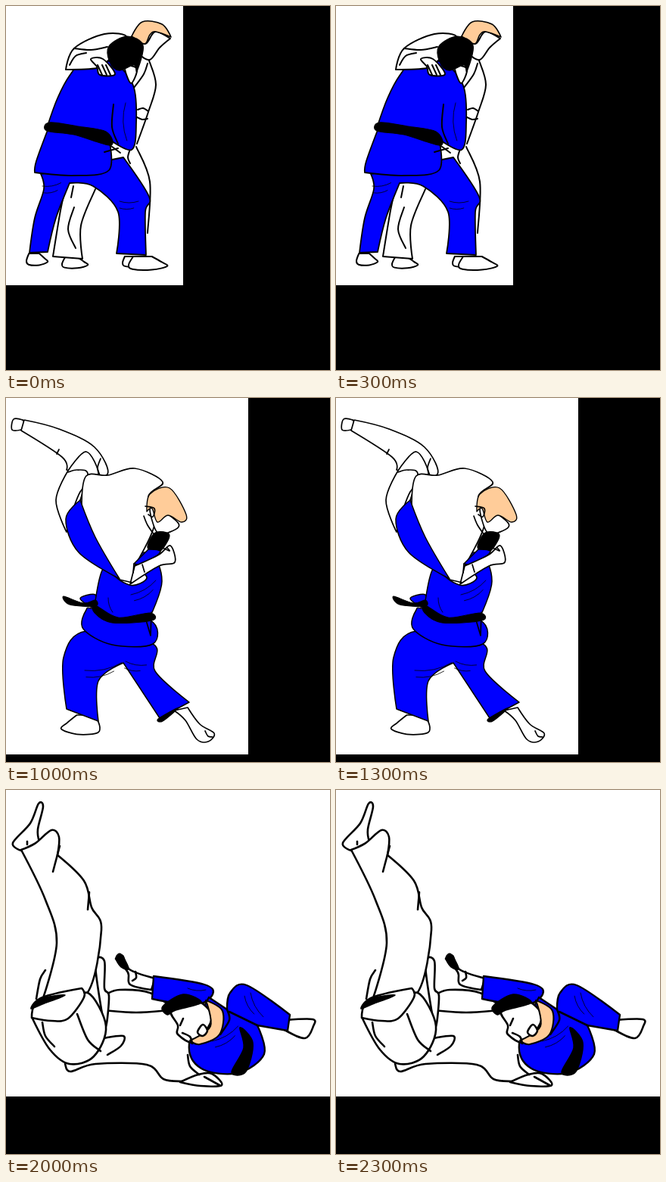
An HTML page that plays this animation: 428 px wide and 481 px high, repeating every 2.5 s.

```html
<!DOCTYPE html>
<html lang="en">
<head>
<meta charset="utf-8">
<title>Judo throw</title>
<style>
html, body { margin: 0; width: 100%; height: 100%; overflow: hidden; background: #000; }
svg { display: block; width: 428px; height: 481px; }
path { stroke: #000; stroke-linejoin: round; stroke-linecap: round; vector-effect: non-scaling-stroke; }
</style>
</head>
<body>
<svg id="stage" viewBox="0 0 428 481"></svg>
<script>
const STEP = 500, LOOP = 2500;
const stage = document.getElementById('stage');
const poses = [];
let layer, weight;

function add(parent, tag, attrs) {
  const el = document.createElementNS('http://www.w3.org/2000/svg', tag);
  for (const k in attrs) el.setAttribute(k, attrs[k]);
  return parent.appendChild(el);
}

// Smooth curve through "x,y" points; a trailing "!" marks a sharp corner.
function curve(text, closed) {
  const pts = text.split(' ').map(s => {
    const [x, y] = s.replace('!', '').split(',').map(Number);
    return { x, y, sharp: s.endsWith('!') };
  });
  const n = pts.length;
  const at = i => closed ? pts[(i + n) % n] : pts[Math.max(0, Math.min(n - 1, i))];
  const handle = (i, dir) => {
    const p = at(i), a = at(i - 1), b = at(i + 1), k = p.sharp ? 0 : dir / 6;
    return `${p.x + (b.x - a.x) * k} ${p.y + (b.y - a.y) * k} `;
  };
  let d = `M${pts[0].x} ${pts[0].y}`;
  for (let i = 0; i < (closed ? n : n - 1); i++) {
    const q = at(i + 1);
    d += `C${handle(i, 1)}${handle(i + 1, -1)}${q.x} ${q.y}`;
  }
  return d;
}

const pen = (fill, scale, closed = true) => (text, transform = '') =>
  add(layer, 'path', { d: curve(text, closed), fill, transform, 'stroke-width': weight * scale });
const white = pen('#fff', 1), blue = pen('#00f', 0.9), skin = pen('#fc9', 0.8);
const black = pen('#000', 0.6), plain = pen('#fff', 0), line = pen('none', 1, false);

// Side view of a foot, heel at x,y; a negative length points it left.
const foot = (x, y, length, height, angle = 0) =>
  white('.12,-1! 0,-.3 .1,.05 .6,.1 1,-.2 .85,-.55 .6,-1!',
    `translate(${x} ${y}) rotate(${angle}) scale(${length} ${height})`);

// Bare shin stepping down to the right.
const shin = (x, y) => {
  white('0,0! 15,13 30,38 45,41 53,30 34,18 18,-4!', `translate(${x} ${y})`);
  line('41,27 45,34 51,35', `translate(${x} ${y})`);
};

// Parallel cloth folds, each shorter than the one before.
function folds(x, y, length, angle, count = 2) {
  for (let i = 0; i < count; i++) {
    const l = length * (1 - i * 0.25);
    add(layer, 'path', {
      d: `M0 ${i * 9}q${l / 2} ${l / 6} ${l} 0`, fill: 'none', 'stroke-width': 0.8,
      transform: `translate(${x} ${y}) rotate(${angle})`
    });
  }
}

function pose(w, h, lineWeight, draw) {
  layer = add(stage, 'g', {});
  weight = lineWeight;
  add(layer, 'rect', { width: w, height: h, fill: '#fff' });
  draw();
  poses.push(layer);
}

// Grip
pose(234, 369, 2, () => {
  line('189,72 198,104 188,140 173,182');
  line('187,76 182,90 169,108');
  line('174,137 181,135 188,139');
  line('173,147 180,150 187,149');
  line('172,186 190,232 187,300');
  line('164,189 161,200 164,208');
  white('166,40 184,50 197,34 217,43! 203,55 190,71 175,62');
  skin('166,40! 180,21 206,24 218,41! 198,34 190,38 183,50');
  // Legs
  foot(74, 345, 34, 13);
  foot(27, 341, 28, 14);
  foot(154, 343, 24, 12);
  foot(162, 347, 51, 16);
  plain('78,244! 62,331! 101,334! 118,242!');
  line('78,244 72,270 62,331! 101,334! 99,290 118,242');
  line('90,266 82,295 92,320');
  line('89,238 86,253');
  blue('46,222! 50,242 38,280 31,326! 55,325! 66,280 84,234! 115,238 148,272 146,327! 185,329! 184,272 189,252 155,200!');
  folds(48, 238, 25, -10);
  folds(150, 258, 25, 0);
  // Jacket
  blue('55,164! 40,205 38,220! 90,224 136,217 136,176!');
  blue('100,77 84,92 68,122 55,158! 136,176! 166,190 172,155 168,105 140,74');
  line('142,130 140,160 148,182');
  folds(158, 128, 50, 88, 1);
  black('57,154 95,159 132,166 138,184 90,170 54,165');
  line('130,193 148,188');
  line('132,180 151,194');
  // Sleeve, head and hand
  white('160,42 130,37 90,56 79,84! 120,82 135,72');
  line('90,56 112,58 134,54');
  line('84,78 92,66 106,62');
  white('157,80 165,102 173,83');
  black('137,74 136,53 160,40 181,52 173,86 169,78 149,85');
  white('112,70 128,70 144,90 124,91 120,80');
  for (const x of [121, 127, 132]) line(`${x},78 ${x + 6},91`);
});

// Turn in
pose(259, 381, 1.8, () => {
  white('30,33! 20,28 15,39 24,51!');
  white('30,33! 82,41! 106,32 84,52 70,62 24,50!');
  line('82,41 76,49');
  foot(109, 365, -38, 23);
  shin(192, 322);
  // Trousers
  blue('72,228 53,265 62,312 88,344! 105,325 103,265 130,254! 142,280 166,332! 212,320! 180,273 172,240');
  black('166,332 195,322 178,333');
  folds(67, 292, 42, -32);
  folds(142, 272, 32, 30);
  // Jacket
  blue('90,202 68,236 130,253 176,236 169,206');
  blue('88,50! 54,75 69,137 90,155 92,198! 168,198! 196,132 201,112 168,96 140,95');
  folds(89, 150, 25, 70, 1);
  folds(192, 122, 60, 120);
  folds(158, 158, 36, 120, 1);
  black('93,191 128,201 169,194 168,206 126,212 93,200');
  // Shoulder, head and arm
  white('85,52 105,32 140,13 165,18 153,78! 139,96 137,110 154,112! 158,123 122,148 97,132 92,105');
  line('128,121 136,128 133,120');
  line('138,110 144,124');
  white('136,52 150,76 158,82 176,66 155,48');
  skin('131,44 135,22 168,21 186,54 172,60 150,49 145,55 139,49 135,60');
  black('154,80 170,76 165,97 148,93');
  white('155,112! 171,97 193,100 190,116 158,124!');
  line('188,106 191,115');
});

// Load
pose(320, 471, 1.7, () => {
  white('22,29! 10,28 8,42 20,42! 25,34');
  white('24,29! 70,41 117,65 133,102 80,95! 74,78 20,43!');
  line('70,68 67,74');
  white('82,96! 66,135 80,177! 98,124 122,103 106,71');
  line('82,98 94,95 108,100 98,135');
  line('125,80 121,92 124,102');
  foot(124, 442, -51, 23);
  shin(222, 413);
  // Trousers
  blue('106,308 76,343 80,411! 122,427! 122,374 155,350! 203,423! 242,402! 197,361 194,325');
  black('201,424 228,409 207,427');
  folds(104, 360, 50, -12);
  folds(158, 348, 28, 10);
  // Jacket
  blue('118,260 98,265 118,278');
  blue('118,279 106,280 102,305 140,326 194,325 191,294');
  blue('128,226 118,268 119,280! 150,294 190,290! 206,242 190,205 150,215');
  folds(165, 260, 38, -30);
  folds(135, 264, 20, 73, 1);
  black('118,274 148,290 190,284 193,294 140,297 117,284');
  black('76,262 102,271 118,267 118,275 84,273');
  line('184,290 191,314! 192,283');
  // Torso and head
  white('106,103 135,102 170,93 207,111 188,130 196,168 170,222! 186,238 163,247 133,222 104,158 100,138');
  blue('98,135! 79,160 96,204 150,239! 118,184');
  white('190,146 200,178 219,176 228,166 202,146');
  skin('186,150! 190,127 216,119 238,154 232,164 214,155 200,164 193,146');
  line('184,143 196,146 194,157 188,154');
  line('182,156 187,168 196,181');
  black('197,178 216,181 203,203 187,198');
  blue('188,200! 204,203 184,219 169,219!');
  white('170,222! 202,207 217,195 223,217 202,222 164,246!');
  line('169,219 168,231');
  line('180,220 183,230');
  line('207,198 216,202 213,198');
  line('150,240 167,244');
});

// Over
pose(364, 481, 2.2, () => {
  white('132,418! 119,414 115,422 118,434 126,434');
  white('302,444! 339,449 343,455 325,470 302,460!');
  // Jacket and trousers
  blue('172,415 129,420 113,452! 157,459 192,464 206,458');
  black('138,461 158,434 173,426 150,460');
  blue('252,410! 306,440! 293,468! 252,448');
  folds(262, 455, 25, -45, 1);
  blue('238,338! 253,374 258,420 236,454 193,452 170,416 164,398! 205,370');
  folds(236, 385, 30, 75);
  folds(180, 428, 25, 45, 1);
  black('206,451 239,448 263,425 242,456 224,462');
  // Far leg and foot
  white('76,94 106,155 102,212');
  line('60,87 55,72 64,54 77,44 70,35 76,22');
  white('28,93! 20,80 42,62 58,29 75,18 70,35 77,44 55,72 50,90!');
  black('60,66! 63,73 79,64! 77,74 52,90!');
  // Torso and near leg
  white('94,268 120,254 137,257! 146,239 161,232 160,205 172,195 188,206 202,246 204,279 207,357! 211,380 178,396 144,369 115,346 62,319!');
  plain('80,285! 100,262! 130,262! 130,310!');
  line('94,268 112,233 104,222');
  white('28,93! 52,92 75,78! 83,140 104,190 92,278 66,323! 25,288 20,242 49,188!');
  line('74,112 72,146');
  line('26,239 22,255 28,273 60,275 94,250');
  line('94,266 120,253 137,257');
  line('93,284 105,276 134,270');
  line('163,198 174,200 184,210');
  black('60,314! 83,297 90,280 67,327!');
  // Head and hands
  black('205,351 237,334 242,342 216,362');
  skin('205,295! 229,297 240,320 225,346 205,348! 202,326');
  white('181,394! 190,372 205,360 215,372 199,389');
  line('204,366 192,382');
  white('208,357! 217,362 232,358 236,371 226,377');
  line('212,365 199,380');
  line('236,376 239,392');
});

// Landing
pose(428, 405, 2.6, () => {
  plain('130,270! 220,285! 246,370! 120,366!');
  line('132,270 150,264 190,268 220,288');
  line('128,291 172,294 216,291');
  line('128,328 155,325 152,338 134,350');
  line('78,362 85,372 118,362 186,363 208,382 233,385');
  white('230,386! 254,376 272,375 285,390 257,391');
  line('262,379 282,390');
  line('255,376 243,365 240,350');
  // Legs
  line('40,276 45,250 52,238');
  white('126,290 118,228 130,226 130,262 136,272 132,312');
  white('20,80! 9,70 32,44 43,18 49,22 42,52 44,68!');
  line('28,68 28,72');
  white('20,79! 38,71 60,53 70,62 68,86! 103,120 113,155 126,185 106,270 48,278! 67,202 52,145');
  line('71,74 62,108');
  line('110,135 108,158');
  white('35,302! 58,343 84,362 116,352 132,312 108,268 80,290');
  line('94,296 108,330 125,345');
  line('48,307 52,325 64,339');
  white('34,301! 44,276 100,262! 103,274 82,302 60,305');
  black('33,289 44,276 78,271 48,283');
  // Far arm
  white('145,223! 154,219 163,237 197,249! 192,264! 164,257 161,241');
  black('145,222 152,217 162,236 152,234');
  line('171,240 172,248 167,252');
  blue('195,246! 262,257 273,270 250,284 193,276!');
  folds(240, 262, 24, 5, 1);
  // Body and leg
  white('370,304! 405,303 406,312 395,328 368,317!');
  blue('268,274! 292,290! 296,268 318,258 375,297! 372,318! 332,311! 341,349 306,374 258,368 242,335');
  line('292,290 295,304 283,323');
  line('295,293 332,311');
  folds(323, 268, 36, 62);
  folds(272, 332, 40, -30);
  black('309,314 326,334 317,372 298,373 314,341');
  // Head
  white('218,290 227,311 227,323 250,333 272,300 250,278');
  skin('264,278! 286,292 282,323 256,336 243,331! 270,312');
  black('207,286 234,270 258,281 224,291 213,297');
  white('253,320 260,310 266,318 260,325');
  line('234,302 230,311');
  line('233,321 243,326 246,335');
});

poses.forEach((g, i) => g.animate(
  [
    { opacity: 1, offset: 0, easing: 'steps(1, end)' },
    { opacity: 0, offset: STEP / LOOP },
    { opacity: 0, offset: 1 }
  ],
  { duration: LOOP, delay: i * STEP - LOOP, iterations: Infinity }
));
</script>
</body>
</html>
```
